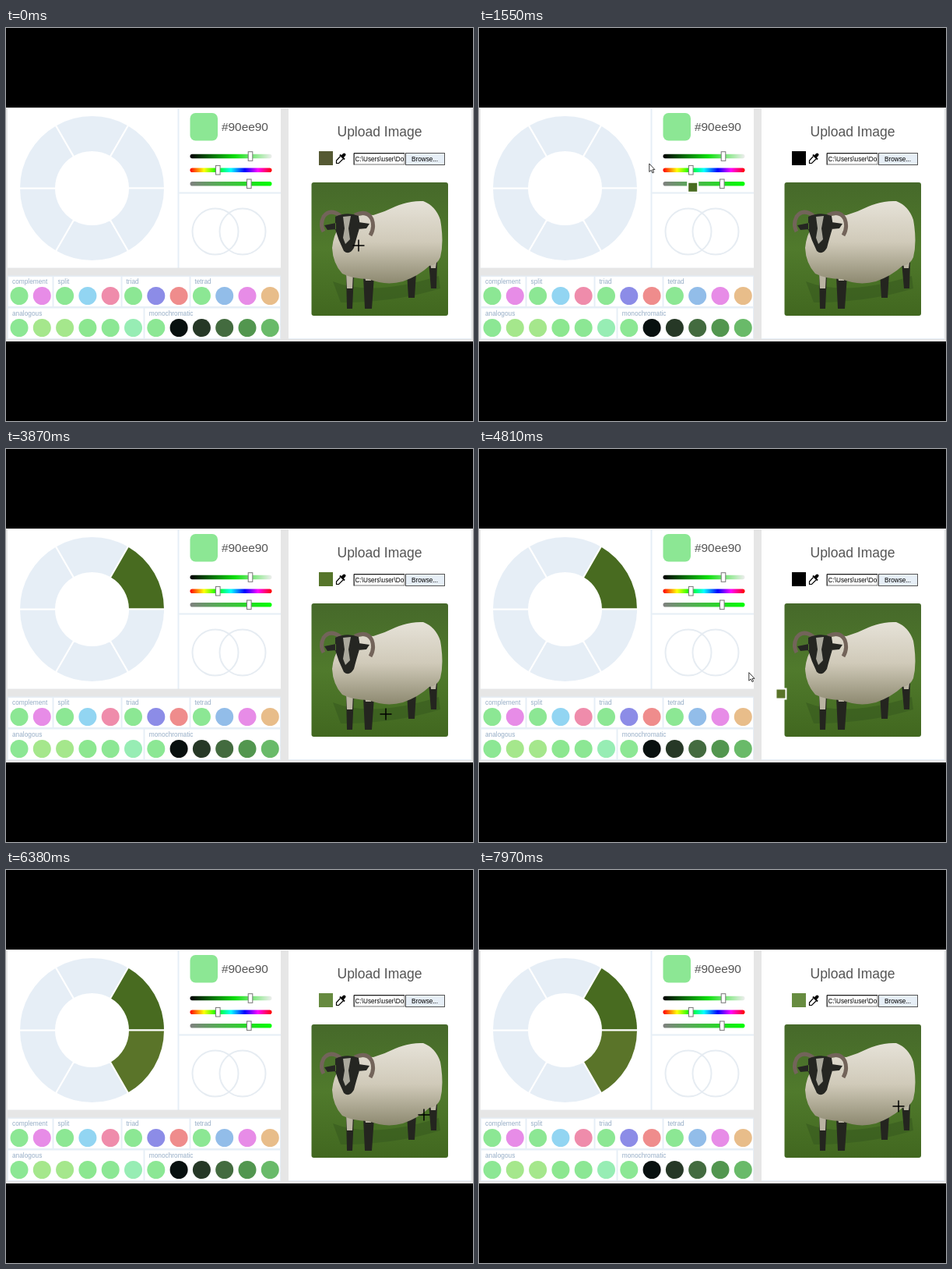
An HTML page that plays this animation: 600 by 504 pixels, repeating every 8 s.

```html
<!DOCTYPE html>
<html lang="en">
<head>
<meta charset="utf-8">
<title>Color picker</title>
<style>
html, body { margin: 0; width: 100%; height: 100%; overflow: hidden; background: #000; }
svg { display: block; font-family: "Liberation Sans", Arial, sans-serif; }
.label { font-size: 8.3px; fill: #96adc6; }
.big { fill: #555; }
.small { font-size: 8.2px; }
</style>
</head>
<body>
<svg id="stage" width="600" height="504" viewBox="0 0 600 504">
  <defs>
    <linearGradient id="light"><stop stop-color="#000"/><stop offset=".55" stop-color="#0ce00c"/><stop offset=".7" stop-color="#5be65b"/><stop offset="1" stop-color="#eee"/></linearGradient>
    <linearGradient id="hue"><stop stop-color="#f00"/><stop offset=".17" stop-color="#ff0"/><stop offset=".33" stop-color="#0f0"/><stop offset=".5" stop-color="#0ff"/><stop offset=".67" stop-color="#00f"/><stop offset=".83" stop-color="#f0f"/><stop offset="1" stop-color="#f00"/></linearGradient>
    <linearGradient id="sat"><stop stop-color="#808080"/><stop offset="1" stop-color="#0f0"/></linearGradient>
    <linearGradient id="grass" x2="0" y2="1"><stop stop-color="#46692a"/><stop offset=".5" stop-color="#507a2c"/><stop offset="1" stop-color="#41671f"/></linearGradient>
    <linearGradient id="wool" x2="0" y2="1"><stop stop-color="#e6e2d8"/><stop offset=".5" stop-color="#d0cab9"/><stop offset="1" stop-color="#8d8970"/></linearGradient>
    <clipPath id="frame"><rect x="392.5" y="198" width="175.5" height="171" rx="3"/></clipPath>
  </defs>

  <path fill="#e6e6e6" d="M0 102H600V402H0Z"/>
  <path fill="#e6eef6" d="M2 103H353V307.5H2ZM2 317.5H353V399H2ZM363 103H598V399H363Z"/>
  <path fill="#fff" d="M2 103H220.5V307.5H2ZM222.5 103H353V210.5H222.5ZM222.5 212.5H353V307.5H222.5Z
    M3 319H59.5V357H3ZM61.5 319H147.5V357H61.5ZM149.5 319H235.5V357H149.5ZM237.5 319H352V357H237.5Z
    M3 359.5H176.5V398H3ZM178.5 359.5H352V398H178.5ZM363 103H597.5V398H363Z"/>

  <g id="wheel" stroke="#fff"></g>

  <rect x="236.5" y="109" width="35.5" height="35.5" rx="7" fill="#8ce794"/>
  <text class="big" x="277" y="132" font-size="15.4">#90ee90</text>
  <g id="sliders"></g>
  <g fill="none" stroke="#e6ecf2" stroke-width="2">
    <circle cx="269" cy="261" r="29.5"/><circle cx="304" cy="261" r="29.5"/>
  </g>
  <g id="harmony"></g>

  <text class="big" x="425.5" y="139" font-size="17.5">Upload Image</text>
  <rect id="swatch" x="402" y="158" width="18" height="18"/>
  <g fill="none" stroke="#000">
    <path stroke-width="4" stroke-linecap="round" d="M433 164l1.5-1.5"/>
    <path stroke-width="2" d="M429 162.5l6 6"/>
    <path stroke-width="1.2" d="M429.5 164.5l-5 5.5v3.5h3l5.5-5.5"/>
  </g>
  <rect x="447.5" y="161" width="64.5" height="14" fill="#fff" stroke="#777"/>
  <path d="M447 175.500V160.500H512" fill="none" stroke="#222"/>
  <text class="small" x="448.500" y="171">C:\Users\user\Do</text>
  <rect x="513.500" y="160.500" width="50" height="15" fill="#e6eef6" stroke="#555"/>
  <text class="small" x="521" y="171">Browse...</text>

  <g clip-path="url(#frame)">
    <path fill="url(#grass)" d="M392 198H569V370H392Z"/>
    <path fill="#385a1f" opacity=".6" d="M420 325Q470 345 556 318L558 334Q500 352 430 352Z"/>
    <path fill="#24251f" d="M437 316h10l-2 44h-7zM459 318h14l-3 42h-9zM515 314h12l-2 32h-8zM543 300h11l-1 34h-7z"/>
    <path fill="#b9b3a2" d="M437 314h9l-1 20h-7zM461 318h10l-2 6h-7zM545 300h8l-1 8h-6z"/>
    <path fill="url(#wool)" d="M444 243Q458 238 472 240Q486 236 500 229Q520 221 536 222Q552 228 558 246Q563 274 558 294Q554 304 544 305Q530 318 510 325Q488 331 466 322Q446 322 432 315Q420 302 419 282Q421 262 432 250Z"/>
    <g fill="none" stroke="#73645a" stroke-width="5">
      <path d="M430 241Q416 231 408 242Q403 252 408 261"/>
      <path d="M448 240Q464 233 470 245Q474 256 468 266"/>
    </g>
    <path fill="#252622" d="M423 242Q438 235 453 241L455 254Q450 270 447 282Q441 292 434 286Q427 272 423 258ZM424 250l-15 3l4 6l11-1zM453 249l14 2l-4 6l-11 1z"/>
    <path fill="#aaa89c" d="M433 242l10-1l-3 16l2 14l-6 6l-3-8l2-12z"/>
  </g>

  <rect id="ghost" width="13" height="13" stroke="#fff" stroke-width="2"/>
  <path id="cross" d="M-7.500 0H7.500M0-7.500V7.500" stroke="#000" stroke-width="1.500"/>
  <path id="arrow" d="M0-1V9.500L2.500 7.300L4.200 11L5.800 10.200L4.200 6.700H7.200Z" fill="#fff" stroke="#222" stroke-width=".9"/>
  <path id="cell" d="M-1.500-4h3v2.500h2.500v3h-2.500v2.500h-3v-2.500h-2.500v-3h2.500z" fill="#fff" stroke="#111" stroke-width="1.200"/>
</svg>
<script>
const $ = id => document.getElementById(id);
const LOOP = 8000, CX = 110.5, CY = 205.5, INNER = 46.5, OUTER = 93.5;

const point = (r, deg) => {
  const a = deg * Math.PI / 180;
  return `${CX + r * Math.cos(a)} ${CY + r * Math.sin(a)}`;
};
const segment = a => `M${point(INNER, a)}L${point(OUTER, a)}A${OUTER} ${OUTER} 0 0 1 ${point(OUTER, a + 60)}` +
  `L${point(INNER, a + 60)}A${INNER} ${INNER} 0 0 0 ${point(INNER, a)}Z`;
$('wheel').innerHTML = [60, 120, 180, 240, 300, 0].map(a => `<path d="${segment(a)}"/>`).join('');
const slices = [...$('wheel').children];

$('sliders').innerHTML = [['light', 164.5, 314], ['hue', 182.2, 272.3], ['sat', 199.8, 312.3]].map(([id, y, x]) =>
  `<rect x="236.5" y="${y - 2.8}" width="105" height="5.6" rx="2.8" fill="url(#${id})"/>
   <rect x="${x - 2.8}" y="${y - 5.8}" width="5.6" height="11.6" fill="#fff" stroke="#777"/>`).join('');

const G = '#8ce794';
const rows = [
  [343.5, [['complement', G, '#e78ce7'], ['split', G, '#92d5f2', '#ef8cab'],
    ['triad', G, '#8c8ce7', '#ef8c8c'], ['tetrad', G, '#92bde9', '#e78ce7', '#e8bd8a']]],
  [384.5, [['analogous', G, '#a5e78c', '#a5e78c', '#8ce790', G, '#97edb4'],
    ['monochromatic', G, '#08100f', '#263826', '#436b3f', '#52964f', '#69ba69']]]
];
$('harmony').innerHTML = rows.map(([y, groups]) => {
  let n = 0;
  return groups.map(([name, ...colors]) =>
    `<text class="label" x="${8 + n * 29.3}" y="${y - 15.8}">${name}</text>` +
    colors.map(c => `<circle cx="${17 + n++ * 29.3}" cy="${y}" r="11.5" fill="${c}"/>`).join('')).join('');
}).join('');

// Pointer path: time, x, y
const path = [
  [0, 453, 279], [30, 453, 279], [250, 400, 245], [610, 458, 219], [1240, 458, 219],
  [1497, 261, 188], [1550, 219, 175], [1800, 168, 166], [2010, 165, 160], [2340, 165, 160],
  [2620, 522, 343], [2680, 522, 344], [2910, 522, 344], [3150, 497, 344], [3310, 497, 344],
  [3610, 489, 341], [3810, 489, 341], [3870, 488, 340], [4530, 488, 340], [5150, 176.5, 224.5],
  [5450, 176.5, 224.5], [5550, 176.5, 224.5], [5920, 565, 300], [6080, 565, 300], [6380, 537, 314],
  [6600, 530, 319], [6840, 538, 306], [7500, 538, 306], [7650, 539, 309], [7880, 539, 309],
  [7970, 539, 303], [LOOP, 539, 303]
];
const picked = [
  [0, '#555933'], [110, '#c9c4b5'], [220, '#4a6a2a'], [520, '#486b20'], [2340, '#5b7a33'],
  [2580, '#2e4808'], [2960, '#4b6a20'], [3350, '#587430'], [3830, '#56752a'], [5700, '#668a3f'], [7900, '#678c40']
];
const drags = [
  { from: 1240, drop: 2340, end: 2380, color: '#486b20', slice: 4 },
  { from: 4530, drop: 5450, end: 5550, color: '#5a7429', slice: 5 }
];

function pointer(t) {
  const i = Math.max(1, path.findIndex(k => k[0] >= t));
  const [t0, x0, y0] = path[i - 1], [t1, x1, y1] = path[i];
  const p = (t - t0) / (t1 - t0);
  return [x0 + (x1 - x0) * p, y0 + (y1 - y0) * p];
}

function show(id, visible, x, y) {
  $(id).style.display = visible ? '' : 'none';
  $(id).setAttribute('transform', `translate(${x} ${y})`);
}

function draw(now) {
  const t = now % LOOP;
  const [x, y] = pointer(t);
  const inPhoto = x > 392 && x < 569 && y > 198 && y < 370;
  const r = Math.hypot(x - CX, y - CY);
  const onWheel = r > INNER && r < OUTER;
  const hovered = onWheel ? (y < CY ? 4 : 5) : -1;

  slices.forEach((s, i) => {
    const drag = drags.find(d => d.slice === i && t >= d.drop);
    s.setAttribute('fill', drag ? drag.color : '#e6eef6');
    s.setAttribute('stroke-width', i === hovered ? 4.5 : 2);
  });

  $('swatch').setAttribute('fill', inPhoto ? picked.filter(k => k[0] <= t).pop()[1] : '#000');
  show('cross', inPhoto, x, y);
  show('cell', onWheel, x, y);
  show('arrow', !inPhoto && !onWheel, x, y);

  // The dragged chip trails the pointer slightly.
  const drag = drags.find(d => t >= d.from && t < d.end);
  const [gx, gy] = pointer(Math.max(0, t - 53));
  show('ghost', drag, gx + 8, gy + 10);
  if (drag) $('ghost').setAttribute('fill', drag.color);
}

const start = performance.now();
(function tick() {
  draw(performance.now() - start);
  requestAnimationFrame(tick);
})();
</script>
</body>
</html>
```
